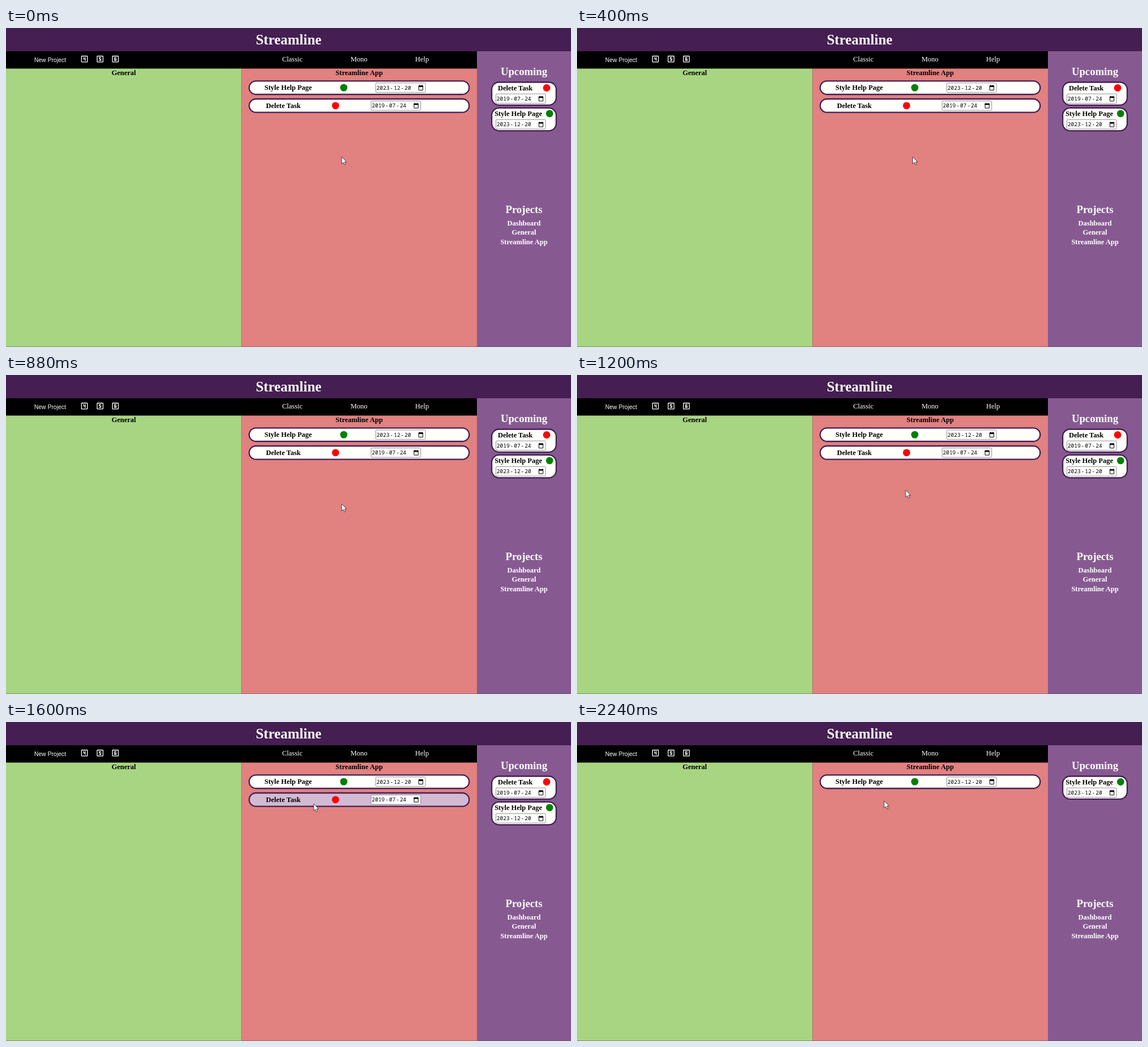
These frames come from a looping animation (997x562 px, 2400 ms). An HTML page:

```html
<!DOCTYPE html>
<html lang="en">
<head>
<meta charset="utf-8">
<title>Task board</title>
<style>
  html, body { margin: 0; width: 100%; height: 100%; overflow: hidden; background: #451e52; }
  svg { display: block; width: 997px; height: 562px; }
  text { font: 12.48px "Liberation Serif", "Times New Roman", serif; white-space: pre; }
  .b { font-weight: bold; }
  .h1 { font-size: 24.96px; }
  .h2 { font-size: 18.72px; }
  .btn { font: 10.4px "Liberation Sans", Arial, sans-serif; }
  .date { font: 9.5px "Noto Sans Mono", "DejaVu Sans Mono", monospace; }
  .mid { text-anchor: middle; }
  .light { fill: #fff; }
</style>
</head>
<body>
<svg id="stage" viewBox="0 0 997 562" xmlns="http://www.w3.org/2000/svg"></svg>
<script>
const LOOP = 2400, HOVER_AT = 1600, DELETE_AT = 2240;
const PURPLE = '#451e52', PAPER = '#fffffb', HOVER = '#d3bad3';

// [time, x, y] of the pointer tip; each place holds until the next
const moves = [
  [0, 592.3, 227], [1200, 580, 202.8], [1360, 562, 172.5], [1440, 551, 155],
  [1600, 543, 144], [1760, 542, 139]
];

const rect = (x, y, w, h, fill, more = '') =>
  `<rect x="${x}" y="${y}" width="${w}" height="${h}" fill="${fill}" ${more}/>`;
const text = (x, y, str, cls) => `<text x="${x}" y="${y}" class="${cls}">${str}</text>`;
const dot = (x, y, fill) => `<circle cx="${x}" cy="${y}" r="6.4" fill="${fill}"/>`;
const pill = (x, y, w, h, r, id) =>
  rect(x, y, w, h, PAPER, `id="${id}" rx="${r}" stroke="${PURPLE}" stroke-width="2.3"`);

function dateBox(x, y, str) {
  return `<g transform="translate(${x} ${y})">` +
    rect(.5, .5, 87.6, 16.6, '#fff', 'rx="1.6" stroke="#767676" stroke-width=".8"') +
    `<text x="1.8" y="12.4" class="date" dx="0 0 0 0 .95 .95 0 .95 .95">${str}</text>` +
    '<path d="M76.4 5.6h7.2v7.6h-7.2z" fill="none" stroke="#000"/>' +
    '<path d="M75.9 5.1h8.2v2.5h-8.2zM77.4 4h1.1v1.5h-1.1zM81.5 4h1.1v1.5h-1.1z"/></g>';
}

function icon(cx, digit) {
  return `<g transform="translate(${cx - 7.8} 46.9) scale(.65)" fill="none" stroke="#fff" stroke-width="2">` +
    `<rect x="4" y="4" width="16" height="16" rx="1"/><path d="${digit}"/></g>`;
}

function row(id, y, name, nameX, color, dotX, date, dateX) {
  return `<g id="${id}">` + pill(429.1, y, 388.2, 23.7, 12, id + 'Bg') +
    text(nameX, y + 15.8, name, 'b') + dot(dotX, y + 11.8, color) +
    dateBox(dateX, y + 3, date) + '</g>';
}

function card(id, name, nameX, color, dotX, date) {
  return `<g id="${id}">` + pill(857.1, 95.5, 113.8, 40.3, 13, id + 'Bg') +
    text(nameX, 109.8, name, 'b') + dot(dotX, 105.5, color) +
    dateBox(864, 115.6, date) + '</g>';
}

const $ = id => document.getElementById(id);

$('stage').innerHTML =
  rect(0, 0, 997, 562, PURPLE) +
  rect(0, 41, 831, 31, '#000') +
  rect(0, 71.5, 415.5, 491, '#a8d582') +
  rect(415.5, 71.5, 415.5, 491, '#e18180') +
  rect(831, 41, 166, 521, '#865a91') +
  rect(0, 561, 997, 1, '#555', 'opacity=".5"') +
  text(498.7, 29.3, 'Streamline', 'b h1 mid light') +
  text(49.8, 59.6, 'New Project', 'btn light') +
  icon(138.4, 'M10 7v5h4M14 7v10') +
  icon(166, 'M15 8h-5v4h4v4H9') +
  icon(193, 'M15 8h-5v8h4v-4h-4') +
  text(487.3, 58.6, 'Classic', 'light') +
  text(608, 58.6, 'Mono', 'light') +
  text(722, 58.6, 'Help', 'light') +
  text(207.8, 83, 'General', 'b mid') +
  text(623.2, 83, 'Streamline App', 'b mid') +
  row('styleRow', 93.3, 'Style Help Page', 456, '#008000', 596, '2023-12-20', 652) +
  row('deleteRow', 125, 'Delete Task', 458.7, '#f00', 581.5, '2019-07-24', 643.7) +
  text(914, 83.3, 'Upcoming', 'b h2 mid light') +
  card('deleteCard', 'Delete Task', 868, '#f00', 954, '2019-07-24') +
  card('styleCard', 'Style Help Page', 862.2, '#008000', 959.2, '2023-12-20') +
  text(914, 326.3, 'Projects', 'b h2 mid light') +
  ['Dashboard', 'General', 'Streamline App']
    .map((name, i) => text(914, 348 + i * 16.4, name, 'b mid light')).join('') +
  '<path id="pointer" d="M0 0V12.4L2.9 9.7L4.9 14.2L6.9 13.3L5 9H8.7Z" fill="#fff" stroke="#222" stroke-width=".8"/>';

function draw(t) {
  const [, x, y] = moves.filter(m => m[0] <= t).pop();
  const deleted = t >= DELETE_AT;
  $('pointer').setAttribute('transform', `translate(${x} ${y})`);
  $('deleteRowBg').setAttribute('fill', t >= HOVER_AT ? HOVER : PAPER);
  for (const id of ['deleteRow', 'deleteCard'])
    $(id).setAttribute('visibility', deleted ? 'hidden' : 'visible');
  $('styleCard').setAttribute('transform', `translate(0 ${deleted ? 0 : 45.3})`);
}

const start = performance.now();
function tick() {
  draw((performance.now() - start) % LOOP);
  requestAnimationFrame(tick);
}
draw(0);
requestAnimationFrame(tick);
</script>
</body>
</html>
```
